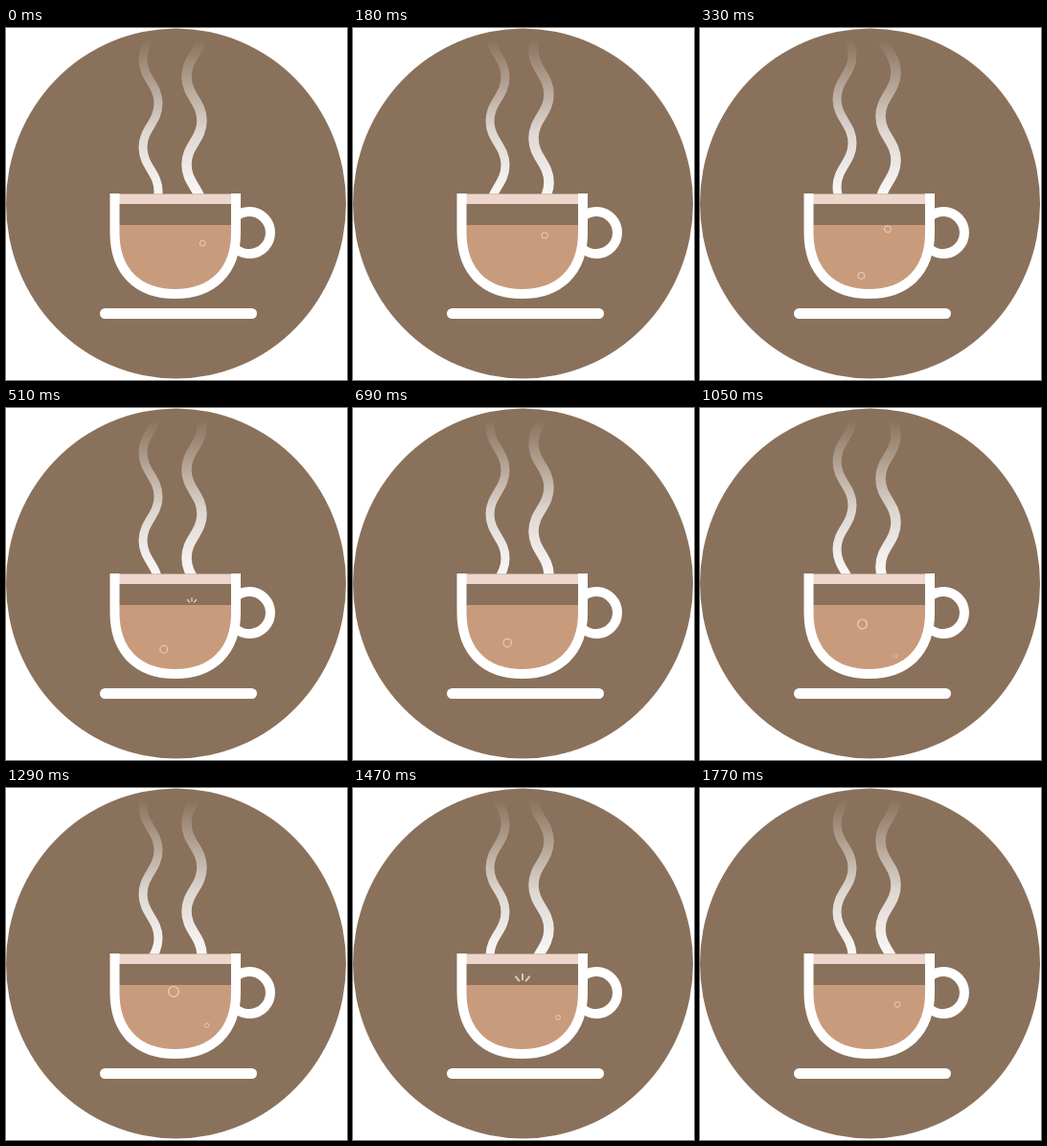
Recreate the animation shown at these times as an HTML page. Size 356 by 368 pixels, loop 1.8 s.

```html
<!DOCTYPE html>
<html lang="en">
<head>
<meta charset="utf-8">
<title>Hot drink</title>
<style>
  html, body { margin: 0; width: 100%; height: 100%; overflow: hidden; background: #fff; }
  svg { display: block; width: 356px; height: 368px; }
</style>
</head>
<body>
<svg viewBox="0 0 356 368" fill="none">
  <defs>
    <linearGradient id="fade" gradientUnits="userSpaceOnUse" x1="0" y1="12" x2="0" y2="173">
      <stop offset="0" stop-color="#fff" stop-opacity="0"/>
      <stop offset=".3" stop-color="#fff" stop-opacity=".36"/>
      <stop offset=".6" stop-color="#fff" stop-opacity=".72"/>
      <stop offset="1" stop-color="#fff" stop-opacity=".95"/>
    </linearGradient>
    <clipPath id="air"><rect y="12" width="356" height="161.5"/></clipPath>
    <clipPath id="inside"><path d="M113.5 173V214C113.5 255 138 278 176.5 278S240 255 240 214V173Z"/></clipPath>
  </defs>

  <ellipse cx="177.5" cy="183.5" rx="177.5" ry="183" fill="#8a715b"/>

  <g clip-path="url(#air)" stroke="url(#fade)">
    <path id="steamLeft" stroke-width="9"/>
    <path id="steamRight" stroke-width="10.5"/>
  </g>

  <g clip-path="url(#inside)">
    <rect x="113" y="173.5" width="127" height="10.5" fill="#edd6cb"/>
    <rect x="113" y="206" width="127" height="74" fill="#c99b7d"/>
  </g>

  <g stroke="#f6e6dc">
    <circle id="bigBubble"/>
    <circle id="smallBubble"/>
    <path id="bigPop" stroke-width="2"/>
    <path id="smallPop" stroke-width="1.5"/>
  </g>

  <g stroke="#fff" stroke-width="10">
    <path d="M113.5 173V214C113.5 255 138 278 176.5 278S240 255 240 214V173"/>
    <path d="M240 197A22 22 0 1 1 240 231"/>
    <path d="M103.5 298.5H256.5" stroke-width="11" stroke-linecap="round"/>
  </g>
</svg>
<script>
const LOOP = 1800;
const WAVE_TIME = 600;
const WAVE = 92;
const $ = id => document.getElementById(id);
const clamp = v => Math.max(0, Math.min(1, v));

// Rising wave; crestY is a leftmost point at time zero.
function steamPath(left, right, crestY, t) {
  const half = WAVE / 2, pull = half * 0.43;
  let y = crestY - (t / WAVE_TIME % 1) * WAVE - 2 * WAVE;
  let x = left, d = `M${x} ${y}`;
  while (y < 180) {
    const next = x === left ? right : left;
    d += `C${x} ${y + pull} ${next} ${y + half - pull} ${next} ${y + half}`;
    x = next;
    y += half;
  }
  return d;
}

// Keys are [time, x, y, radius], joined linearly.
function along(keys, t) {
  const i = Math.max(1, keys.findIndex(k => k[0] >= t));
  const a = keys[i - 1], b = keys[i];
  const p = (t - a[0]) / (b[0] - a[0]);
  return a.map((v, j) => v + (b[j] - v) * p);
}

function drawBubble(el, keys, t) {
  const start = keys[0][0], end = keys[keys.length - 1][0];
  if (t < start) t += LOOP;
  const alive = t >= start && t < end;
  el.setAttribute("visibility", alive ? "visible" : "hidden");
  if (!alive) return;
  const [, x, y, r] = along(keys, t);
  el.setAttribute("cx", x);
  el.setAttribute("cy", y);
  el.setAttribute("r", r);
  el.setAttribute("stroke-width", 0.55 + r * 0.12);
  el.setAttribute("opacity", 0.75 * clamp((t - start) / 90));
}

function drawPop(el, x, y, size, start, t) {
  const p = (t - start) / 180;
  const alive = p > 0 && p < 1;
  el.setAttribute("visibility", alive ? "visible" : "hidden");
  if (!alive) return;
  const from = size * (3 + 4 * p), to = from + size * 7 * Math.sin(Math.PI * p);
  el.setAttribute("d", [-0.68, 0, 0.68].map(a => {
    const sx = Math.sin(a), cy = Math.cos(a);
    return `M${x + sx * from} ${y - cy * from}L${x + sx * to} ${y - cy * to}`;
  }).join(""));
  el.setAttribute("opacity", 0.75);
}

const bigKeys = [[180, 171, 264, 3.2], [330, 168.3, 259, 3.5], [690, 161.2, 245.5, 4.2], [1050, 169.5, 226, 4.9], [1380, 177, 208, 5.5]];
const smallKeys = [[990, 202.5, 262, 1.9], [1480, 214.3, 239.5, 2.4], [1800, 205.3, 225, 2.9], [2200, 194, 207, 3.6]];

function render(time) {
  const t = time % LOOP;
  $("steamLeft").setAttribute("d", steamPath(143, 159, 125, t));
  $("steamRight").setAttribute("d", steamPath(188.5, 204.5, 143, t));
  drawBubble($("bigBubble"), bigKeys, t);
  drawBubble($("smallBubble"), smallKeys, t);
  drawPop($("bigPop"), 177, 206, 1, 1380, t);
  drawPop($("smallPop"), 194, 206, 0.65, 400, t);
}

const begin = performance.now();
function tick() {
  render(performance.now() - begin);
  requestAnimationFrame(tick);
}
tick();
</script>
</body>
</html>
```
